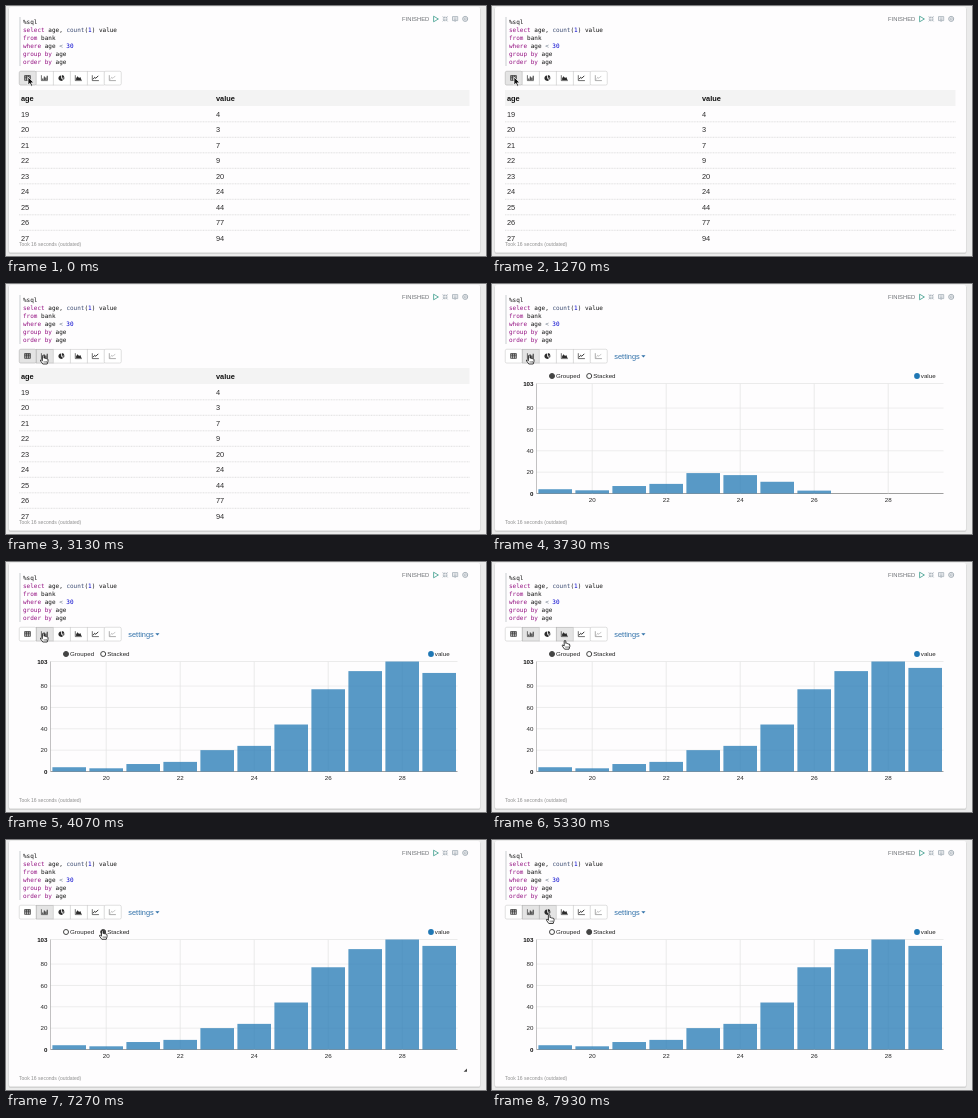
An HTML page that plays this animation: 480 by 250 pixels, repeating every 8 s.

```html
<!DOCTYPE html>
<html lang="en">
<head>
<meta charset="utf-8">
<title>Query result views</title>
<style>
  html, body { margin: 0; width: 100%; height: 100%; overflow: hidden; background: #ebebeb; }
  svg { display: block; width: 480px; height: 250px; font-family: "Liberation Sans", Arial, sans-serif; }
  .code { font: 6px "DejaVu Sans Mono", "Liberation Mono", monospace; white-space: pre; }
  .cell { font-size: 7.4px; fill: #2b2b2b; }
  .axis { font-size: 6.2px; fill: #222; }
  .bold { font-weight: bold; fill: #111; }
</style>
</head>
<body>
<svg id="stage" viewBox="0 0 480 250"></svg>
<script>
const LOOP = 8000;
const SHOW_CHART = 3270, STACKED_AT = 6300;
const GROW = 300, STAGGER = 57;
const VALUES = [4, 3, 7, 9, 20, 24, 44, 77, 94, 103, 97];
const FIRST_AGE = 19;
const BASE = 209.5, UNIT = 110 / 103;
const stage = document.getElementById('stage');

function add(parent, tag, attrs = {}, text) {
  const el = document.createElementNS('http://www.w3.org/2000/svg', tag);
  for (const key in attrs) el.setAttribute(key, attrs[key]);
  if (text !== undefined) el.textContent = text;
  parent.append(el);
  return el;
}
const rect = (parent, x, y, width, height, fill, more) =>
  add(parent, 'rect', { x, y, width, height, fill, ...more });
const line = (parent, x1, y1, x2, y2, stroke, more) =>
  add(parent, 'line', { x1, y1, x2, y2, stroke, ...more });
const label = (parent, x, y, text, more) => add(parent, 'text', { x, y, ...more }, text);
const path = (parent, d, more) => add(parent, 'path', { d, ...more });
const show = (el, on) => el.setAttribute('visibility', on ? 'visible' : 'hidden');

// Card
rect(stage, 0, 0, 480, 250, '#ebebeb');
rect(stage, 2.5, 1.5, 472, 246.5, '#d2d2d2', { rx: 2 });
rect(stage, 3, 1, 471, 245.6, '#fefdfe', { rx: 1.5 });

// Query editor
line(stage, 14, 11, 14, 60, '#c9cdd0', { 'stroke-width': 1 });
const INK = { k: '#930f80', f: '#3c4c72', n: '#0000cd', o: '#687687', p: '#111' };
[
  [['p', '%sql']],
  [['k', 'select'], ['p', ' age, '], ['f', 'count'], ['p', '('], ['n', '1'], ['p', ') value']],
  [['k', 'from'], ['p', ' bank']],
  [['k', 'where'], ['p', ' age '], ['o', '<'], ['n', ' 30']],
  [['k', 'group by'], ['p', ' age']],
  [['k', 'order by'], ['p', ' age']]
].forEach((parts, i) => {
  const row = label(stage, 17, 17.8 + i * 8.05, '', { class: 'code' });
  for (const [kind, text] of parts) add(row, 'tspan', { fill: INK[kind] }, text);
});

// Paragraph controls
label(stage, 396, 14.9, 'FINISHED', { 'font-size': 5.85, fill: '#6d7175' });
const thin = { fill: 'none', stroke: '#a3adb5', 'stroke-width': 0.8 };
path(stage, 'M427.6 10.2L432.4 13L427.6 15.8Z', { ...thin, stroke: '#3c9c8c' });
path(stage, 'M436.7 10.4L438.4 12.1V10.6M438.4 12.1H436.8M441.6 10.4L439.9 12.1V10.6M439.9 12.1H441.5' +
  'M436.7 15.4L438.4 13.7V15.2M438.4 13.7H436.8M441.6 15.4L439.9 13.7V15.2M439.9 13.7H441.5', thin);
path(stage, 'M446.5 10.6H451.7V14.6H446.5ZM447.6 12H450.6M447.6 13.3H450.6M449.1 14.6V16', thin);
add(stage, 'circle', { ...thin, cx: 459.2, cy: 12.9, r: 1.1 });
add(stage, 'circle', { ...thin, cx: 459.2, cy: 12.9, r: 2.5, 'stroke-width': 1 });

// View buttons
const buttons = Array.from({ length: 6 }, (_, i) =>
  rect(stage, 13.25 + i * 17, 65.25, 17, 13.8, '#fff', { stroke: '#ccc', 'stroke-width': 0.6, rx: i % 5 ? 0 : 1.5 }));
const solid = { fill: '#2c2c2c' };
const stroke = { fill: 'none', stroke: '#333', 'stroke-width': 0.7 };
const icons = [
  g => path(g, 'M-2.9 -2.4H2.9V2.4H-2.9ZM-2.9 -1.9H2.9M-2.9 -.6H2.9M-2.9 .9H2.9M-1 -2.4V2.4M1 -2.4V2.4', stroke),
  g => {
    path(g, 'M-3.1 -2.8V2.6H3.3', stroke);
    path(g, 'M-2.2 .4h1v1.6h-1ZM-.7 -1.4h1v3.4h-1ZM.8 -.5h1v2.5h-1ZM2.2 -2.2h1v4.2h-1Z', solid);
  },
  g => path(g, 'M-.4 -2.5V.2L1.6 2A2.7 2.7 0 1 1 -.4 -2.5ZM.4 -2.9A2.7 2.7 0 0 1 3 -.3H.4ZM.6 .3H3A2.7 2.7 0 0 1 2.3 1.8Z', solid),
  g => {
    path(g, 'M-3.2 -2.8V2.6H3.4', stroke);
    path(g, 'M-2.4 2V.3L-1 -1.8L.6 -.1L1.8 -1.1L3 2Z', solid);
  },
  g => {
    path(g, 'M-3.2 -2.8V2.6H3.4', stroke);
    path(g, 'M-2.4 1.2L-.8 -.7L.3 .3L2.8 -2.2', { ...stroke, 'stroke-width': 1 });
  },
  g => {
    path(g, 'M-3.2 -2.8V2.6H3.4', { ...stroke, stroke: '#888' });
    path(g, 'M-2.2 1.4L-.8 -.6L.4 .4L2.8 -2.1', { ...stroke, stroke: '#888', 'stroke-dasharray': '1 .6' });
  }
];
icons.forEach((draw, i) => draw(add(stage, 'g', { transform: `translate(${21.5 + i * 17} 72)` })));

// Table view
const table = add(stage, 'g');
rect(table, 13, 84, 450.5, 16, '#f3f3f3');
label(table, 15, 94.7, 'age', { class: 'cell bold' });
label(table, 210, 94.7, 'value', { class: 'cell bold' });
VALUES.slice(0, 9).forEach((value, i) => {
  const y = 110.7 + i * 15.5;
  label(table, 15, y, FIRST_AGE + i, { class: 'cell' });
  label(table, 210, y, value, { class: 'cell' });
  if (i < 8) line(table, 13, y + 5.1, 463.5, y + 5.1, '#ccc', { 'stroke-width': 0.6, 'stroke-dasharray': '1 .6' });
});

// Chart view
const chart = add(stage, 'g');
label(chart, 122.3, 74.6, 'settings', { 'font-size': 7.4, fill: '#3071a9' });
path(chart, 'M149.3 71.2H153.5L151.4 73.4Z', { fill: '#3071a9' });

function option(x, text) {
  const dot = add(chart, 'circle', { cx: x, cy: 92, r: 2.5, stroke: '#444', 'stroke-width': 1 });
  label(chart, x + 4, 94.1, text, { class: 'axis' });
  return dot;
}
const grouped = option(60, 'Grouped');
const stacked = option(97.2, 'Stacked');
add(chart, 'circle', { cx: 425, cy: 92, r: 2.9, fill: '#1f77b4' });
label(chart, 428.8, 94.1, 'value', { class: 'axis' });

for (const tick of [0, 20, 40, 60, 80, 103]) {
  const y = BASE - tick * UNIT;
  line(chart, 44.5, y, 451.5, y, tick ? '#e4e4e4' : '#777', { 'stroke-width': 0.7 });
  label(chart, 41.5, y + 2.2, tick, { class: tick % 103 ? 'axis' : 'axis bold', 'text-anchor': 'end' });
}
for (let age = 20; age < 30; age += 2) {
  const x = 63.2 + (age - FIRST_AGE) * 37;
  line(chart, x, 99.5, x, BASE, '#e4e4e4', { 'stroke-width': 0.7 });
  label(chart, x, 217.6, age, { class: 'axis', 'text-anchor': 'middle' });
}
line(chart, 44.5, 99.5, 44.5, BASE, '#999', { 'stroke-width': 0.6 });
const bars = VALUES.map((_, i) =>
  rect(chart, 46.4 + i * 37, BASE, 33.6, 0, '#1f77b4', { 'fill-opacity': 0.74 }));
const grip = path(stage, 'M461 228.6V231.8H457.6Z', { fill: '#444' });

label(stage, 13, 239.6, 'Took 16 seconds (outdated)', { 'font-size': 5.06, fill: '#909090' });

// Pointers, both with the hot spot at 0,0
const outline = { 'stroke-width': 0.7, 'stroke-linejoin': 'round' };
const arrow = path(stage, 'M0 0V8L1.9 6.3L3.2 9.2L4.6 8.6L3.3 5.8H5.8Z', { ...outline, fill: '#111', stroke: '#fff' });
const hand = add(stage, 'g');
path(hand, 'M-.8 .7Q0 -.5 .8 .7V3.2Q1.6 2.6 2.2 3.4Q3 2.9 3.5 3.8Q4.6 3.4 4.8 4.8V6.3L4 9H-.4L-2.6 6Q-3.2 4.8 -2.1 4.7L-.8 5.8Z',
  { ...outline, fill: '#fff', stroke: '#111', 'stroke-width': 0.8 });
path(hand, 'M.9 6V7.8M2.1 6V7.8M3.3 6V7.8', { ...stroke, 'stroke-width': 0.5 });

// Pointer stops: arrival start, arrival end, x, y
const MOVES = [
  [1300, 2000, 37.2, 71],
  [4600, 5330, 73, 78.2],
  [5470, 6130, 97.5, 90.8],
  [7200, 7880, 57.2, 74.5]
];
const clamp = v => Math.max(0, Math.min(1, v));
const cubic = v => v < 0.5 ? 4 * v ** 3 : 1 - 4 * (1 - v) ** 3;

function pointerAt(t) {
  let x = 22, y = 71;
  for (const [from, to, nextX, nextY] of MOVES) {
    const p = clamp((t - from) / (to - from)), eased = p * p * (3 - 2 * p);
    x += (nextX - x) * eased;
    y += (nextY - y) * eased;
  }
  return { x, y };
}

function render(t) {
  const charting = t >= SHOW_CHART;
  const { x, y } = pointerAt(t);
  const hovered = y > 65 && y < 79.2 ? Math.floor((x - 13) / 17) : -1;
  const active = charting ? 1 : 0;

  buttons.forEach((button, i) => {
    const on = i === active || i === hovered;
    button.setAttribute('fill', on ? '#e4e4e4' : '#fff');
    button.setAttribute('stroke', on ? '#b0b0b0' : '#ccc');
  });

  show(table, !charting);
  show(chart, charting);
  show(grip, charting && y > 84);
  bars.forEach((bar, i) => {
    const height = VALUES[i] * UNIT * cubic(clamp((t - SHOW_CHART - i * STAGGER) / GROW));
    bar.setAttribute('y', BASE - height);
    bar.setAttribute('height', height);
  });

  const isStacked = t >= STACKED_AT;
  grouped.setAttribute('fill', isStacked ? '#fff' : '#444');
  stacked.setAttribute('fill', isStacked ? '#444' : '#fff');

  const onLegend = y > 88 && x > 93;
  const pointing = hovered > 0 || onLegend;
  show(hand, pointing);
  show(arrow, !pointing);
  for (const el of [hand, arrow]) el.setAttribute('transform', `translate(${x} ${y})`);
}

const start = performance.now();
function tick() {
  render((performance.now() - start) % LOOP);
  requestAnimationFrame(tick);
}
tick();
</script>
</body>
</html>
```
